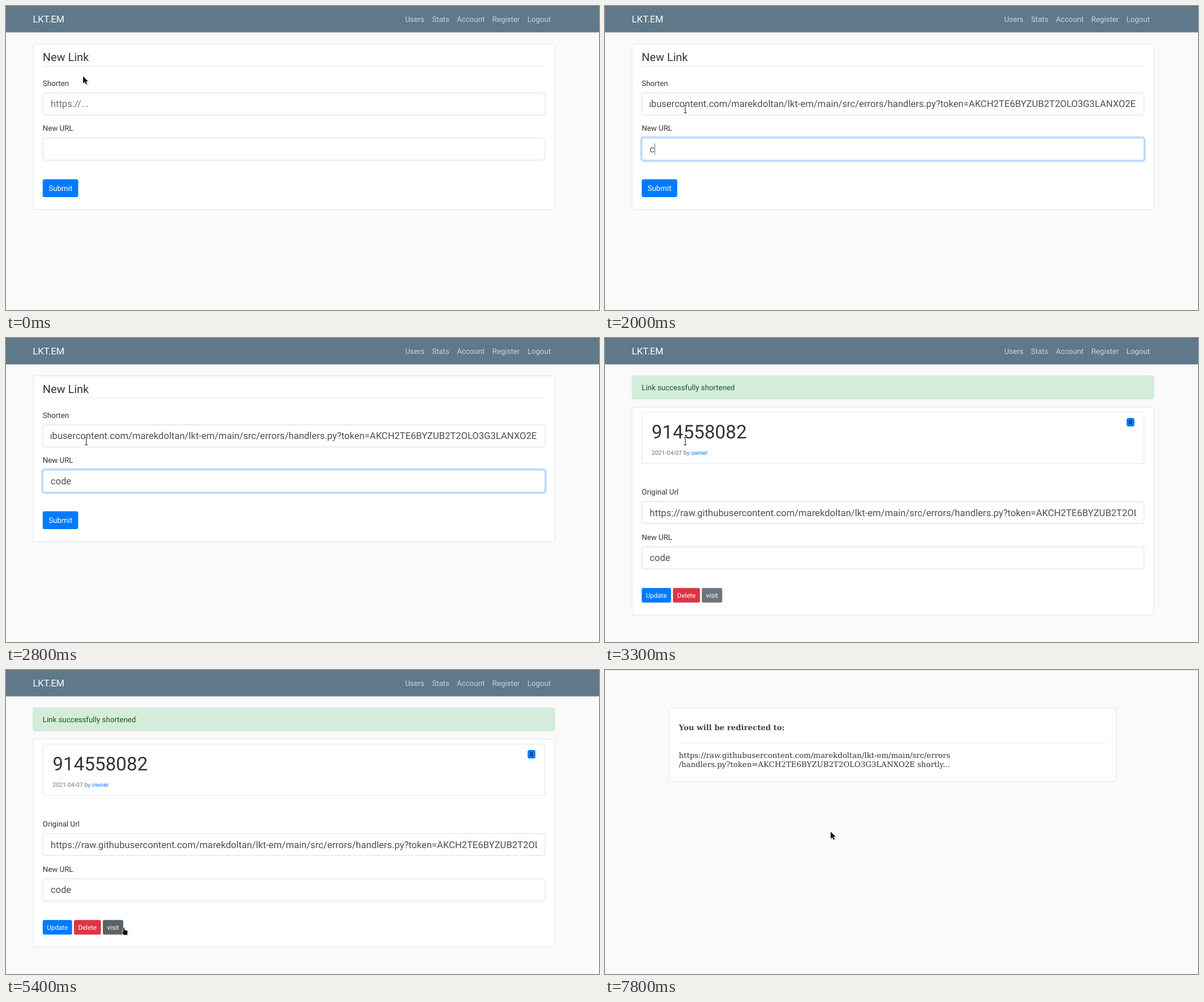
Recreate the animation shown at these times as an HTML page. Size 1046 by 536 pixels, loop 8000 ms.

```html
<!DOCTYPE html>
<html lang="en">
<head>
<meta charset="utf-8">
<title>Link shortener</title>
<style>
  html, body { margin: 0; width: 100%; height: 100%; overflow: hidden; background: #fafafa; }
  svg { display: block; width: 1046px; height: 536px; }
  text { font-family: Roboto, Arial, sans-serif; text-rendering: geometricPrecision; white-space: pre; }
  .serif text { font-family: "DejaVu Serif", serif; }
  #popup text { font-family: "Noto Sans", sans-serif; }
</style>
</head>
<body>
<svg id="stage" viewBox="0 0 1046 536" xmlns="http://www.w3.org/2000/svg"></svg>
<script>
const LOOP = 8000, STEP = 100, SCALE = 0.83;
const LEFT = 57, INNER = 78, RIGHT = 1146;
const INK = '#333', FIELD_INK = '#495057', BLUE = '#007bff';
const HOST = 'https://raw.githubusercontent.com/marekdoltan/lkt-em/main/src/errors';
const FILE = '/handlers.py?token=AKCH2TE6BYZUB2T2OLO3G3LANXO2E';
const SUGGESTIONS = ['code', 'coin', 'chat', 'cart'];

const text = (x, y, str, size = 16, fill = INK, attrs = '') =>
  `<text x="${x}" y="${y}" font-size="${size}" fill="${fill}" ${attrs}>${str}</text>`;

const rect = (x, y, w, h, fill, attrs = '') =>
  `<rect x="${x}" y="${y}" width="${w}" height="${h}" fill="${fill}" ${attrs}/>`;

// Box with a one pixel border inside its bounds
const panel = (x, y, w, h, fill, stroke, r, attrs = '') =>
  rect(x + .5, y + .5, w - 1, h - 1, fill, `stroke="${stroke}" rx="${r}" ${attrs}`);

const card = (x, y, w, h) => panel(x, y, w, h, '#fff', '#ddd', 3);

const button = (x, y, w, h, label, size, fill, id) =>
  rect(x, y, w, h, fill, `rx="${size > 14 ? 4 : 3.2}" id="${id}"`) +
  text(x + w / 2, y + h / 2 + size * .343, label, size, '#fff', 'text-anchor="middle"');

const field = (id, y, label, value = '', attrs = `x="95"`) =>
  text(INNER, y - 14.5, label) +
  rect(INNER - 1.6, y - 1.6, RIGHT - INNER + 3.2, 51.2, 'none',
    `id="${id}Ring" rx="6.4" stroke="${BLUE}" stroke-width="3.2" opacity="0"`) +
  panel(INNER, y, RIGHT - INNER, 48, '#fff', '#ced4da', 4.8, `id="${id}Box"`) +
  `<svg x="95" y="${y}" width="1034" height="48" viewBox="95 ${y} 1034 48">
    <text id="${id}Text" ${attrs} y="${y + 30.8}" font-size="20" fill="${FIELD_INK}">${value}</text>
  </svg>`;

const navLinks = [['Users', 848.5], ['Stats', 905.3], ['Account', 958.2], ['Register', 1033.4], ['Logout', 1108]];

const nav = rect(0, 0, 1262, 56, '#5f788a') +
  text(LEFT, 34.8, 'LKT.EM', 20, '#fff') +
  navLinks.map(([s, x]) => text(x, 33.5, s, 16, '#cbd5db')).join('');

const formPage = card(LEFT, 80, 1110, 353) +
  text(INNER, 117.2, 'New Link', 24) +
  rect(INNER, 127, RIGHT - INNER, 1, '#dee2e6') +
  field('long', 184, 'Shorten') +
  field('short', 280, 'New URL') +
  button(INNER, 368, 75.5, 38, 'Submit', 16, BLUE, 'submit') +
  rect(0, 0, 1, 24, FIELD_INK, 'id="caret"') +
  '<g id="popup"></g>';

const resultPage = panel(LEFT, 80, 1110, 50, '#d4edda', '#c3e6cb', 4) +
  text(INNER, 110.5, 'Link successfully shortened', 16, '#155724') +
  card(LEFT, 146, 1110, 443) +
  card(INNER, 157, RIGHT - INNER, 110) +
  text(99, 213.7, '914558082', 40) +
  text(99, 248.1, `2021-04-07 by <tspan fill="${BLUE}">owner</tspan>`, 12.8, '#6c757d') +
  rect(1108.6, 170, 16.4, 18, BLUE, 'rx="4"') +
  text(1116.8, 183.3, '0', 12, '#212529', 'text-anchor="middle" font-weight="700"') +
  field('saved', 347, 'Original Url', HOST + FILE) +
  field('alias', 443, 'New URL', 'code') +
  button(INNER, 531, 62.4, 31, 'Update', 14, BLUE, 'update') +
  button(144.4, 531, 57.4, 31, 'Delete', 14, '#dc3545', 'remove') +
  button(205.7, 531, 43.4, 31, 'visit', 14, '#6c757d', 'visit');

const redirectPage = card(136, 80, 951, 157) +
  text(157, 127.7, 'You will be redirected to:', 16, '#444', 'font-weight="700"') +
  rect(157, 154.5, 909, 1, '#e5e5e5') +
  text(157, 186.6, HOST) +
  text(157, 205.8, FILE + ' shortly...');

const pointer = (id, d) => `<g id="${id}">
  <path d="${d}" transform="translate(1.2 1.2)" fill="#000" stroke="#000" stroke-width="1.2" opacity=".18"/>
  <path d="${d}" fill="#111" stroke="#fff" stroke-width="1.3" stroke-linejoin="round" paint-order="stroke"/></g>`;

const cursors =
  pointer('arrow', 'M0 0V12.4L2.8 9.8L4.9 14.2L6.9 13.3L4.9 9H8.8Z') +
  pointer('hand', 'M-1 .6Q0 -.6 1 .6L1.3 4.6L6 5.5Q7.2 6 7 8L6 13H0L-2.8 8.6Q-3.2 6.8 -1.4 7.4L-.4 8.4Z') +
  `<g id="beam" fill="none">
    <path d="M-2.5 -6.5H2.5M0 -6.5V6.5M-2.5 6.5H2.5" stroke="#fff" stroke-width="2.6"/>
    <path d="M-2.5 -6.5H2.5M0 -6.5V6.5M-2.5 6.5H2.5" stroke="#222" stroke-width="1"/></g>`;

document.getElementById('stage').innerHTML = `
  ${rect(0, 0, 1046, 536, '#fafafa', 'id="back"')}
  <g transform="scale(${SCALE})">
    <g id="nav">${nav}</g><g id="form">${formPage}</g>
    <g id="result">${resultPage}</g><g id="redirect" class="serif">${redirectPage}</g>
  </g>
  ${rect(0, 0, 1046, 1, '#000', 'opacity=".1"')}
  <g id="cursor">${cursors}</g>`;

const $ = id => document.getElementById(id);
const show = (id, on) => $(id).setAttribute('display', on ? 'inline' : 'none');
const set = (id, attrs) => Object.entries(attrs).forEach(([k, v]) => $(id).setAttribute(k, v));
const mix = (a, b, p) => a + (b - a) * p;
const clamp = p => Math.max(0, Math.min(1, p));
const linear = p => p;
const easeIn = p => p ** 1.5;
const smooth = p => p * p * (3 - 2 * p);

// Start, end, target x and y, easing
const moves = [
  [200, 600, 141.5, 182, linear],
  [4000, 4500, 121.5, 251, easeIn],
  [4500, 4900, 101.5, 439, linear],
  [4900, 5100, 72, 452, linear],
  [5100, 5400, 207.5, 454, smooth],
  [6000, 6100, 206.5, 455, linear],
  [7100, 7800, 398, 285, smooth]
];

function cursorAt(t) {
  let x = 136, y = 124;
  for (const [start, end, toX, toY, ease] of moves) {
    const p = ease(clamp((t - start) / (end - start)));
    x = mix(x, toX, p);
    y = mix(y, toY, p);
  }
  return [x, y];
}

function cursorKind(t, y) {
  if (t < 3300) return y > 152 ? 'beam' : 'arrow';
  if (t < 5800) {
    if (y > 440) return 'hand';
    return y < 200 || (y > 288 && y < 328) || (y > 367 && y < 408) ? 'beam' : 'arrow';
  }
  return t < 6100 ? 'hand' : 'arrow';
}

function setFocus(id, p) {
  const channel = (a, b) => Math.round(mix(a, b, p));
  set(id + 'Ring', { opacity: .25 * p });
  set(id + 'Box', { stroke: `rgb(${channel(206, 128)},${channel(212, 189)},${channel(218, 255)})` });
}

function drawPopup(typed) {
  const rows = SUGGESTIONS.filter(s => s.startsWith(typed));
  const h = 32 * rows.length - 1;
  $('popup').innerHTML =
    rect(INNER - 1.5, 328, RIGHT - INNER + 3, h + 1.5, '#000', 'opacity=".1" rx="2"') +
    panel(INNER, 328, RIGHT - INNER, h, '#fff', '#ccc', 1) +
    rows.map((s, i) => text(88, 349 + 32 * i, s, 14)).join('');
}

function drawForm(t) {
  const pasted = t >= 1100, second = t >= 1600;
  const swap = clamp((t - 1500) / 200);
  setFocus('long', clamp((t - 700) / 200) * (1 - swap));
  setFocus('short', swap);

  set('longText', { x: pasted ? 1128 : 95, 'text-anchor': pasted ? 'end' : 'start', fill: pasted ? FIELD_INK : '#6c757d' });
  $('longText').textContent = pasted ? HOST + FILE : 'https://...';

  const count = t < 2000 ? 0 : t < 2200 ? 1 : clamp((t - 2000) / 400) * 4 - (t < 2400 ? 0 : 0);
  const typed = 'code'.slice(0, Math.floor(count));
  $('shortText').textContent = typed;

  const caretX = second ? 95 + $('shortText').getComputedTextLength() : pasted ? 1128 : 95;
  show('caret', t >= 800 && t < 2500);
  set('caret', { x: caretX, y: second ? 292 : 196 });

  const open = t >= 2100 && t < 2800;
  show('popup', open);
  if (open) drawPopup(typed);
}

function draw(time) {
  const t = Math.floor(time / STEP) * STEP;
  show('nav', t < 5800);
  show('form', t < 3300);
  show('result', t >= 3300 && t < 5800);
  show('redirect', t >= 6000);
  set('back', { fill: t >= 5800 && t < 6000 ? '#f9f9f9' : '#fafafa' });
  if (t < 3300) drawForm(t);

  const [x, y] = cursorAt(t);
  const kind = cursorKind(t, y);
  const over = (from, to) => kind === 'hand' && x > from * SCALE && x < to * SCALE;
  set('remove', { fill: over(144.4, 201.8) ? '#c82333' : '#dc3545' });
  set('visit', { fill: t >= 5700 ? '#545b62' : over(205.7, 255) ? '#5a6268' : '#6c757d' });

  set('cursor', { transform: `translate(${x.toFixed(1)} ${y.toFixed(1)})` });
  show('cursor', t < 2100 || t >= 2800);
  ['arrow', 'hand', 'beam'].forEach(id => show(id, id === kind));
}

const began = performance.now();
function tick() {
  draw((performance.now() - began) % LOOP);
  requestAnimationFrame(tick);
}
tick();
</script>
</body>
</html>
```
